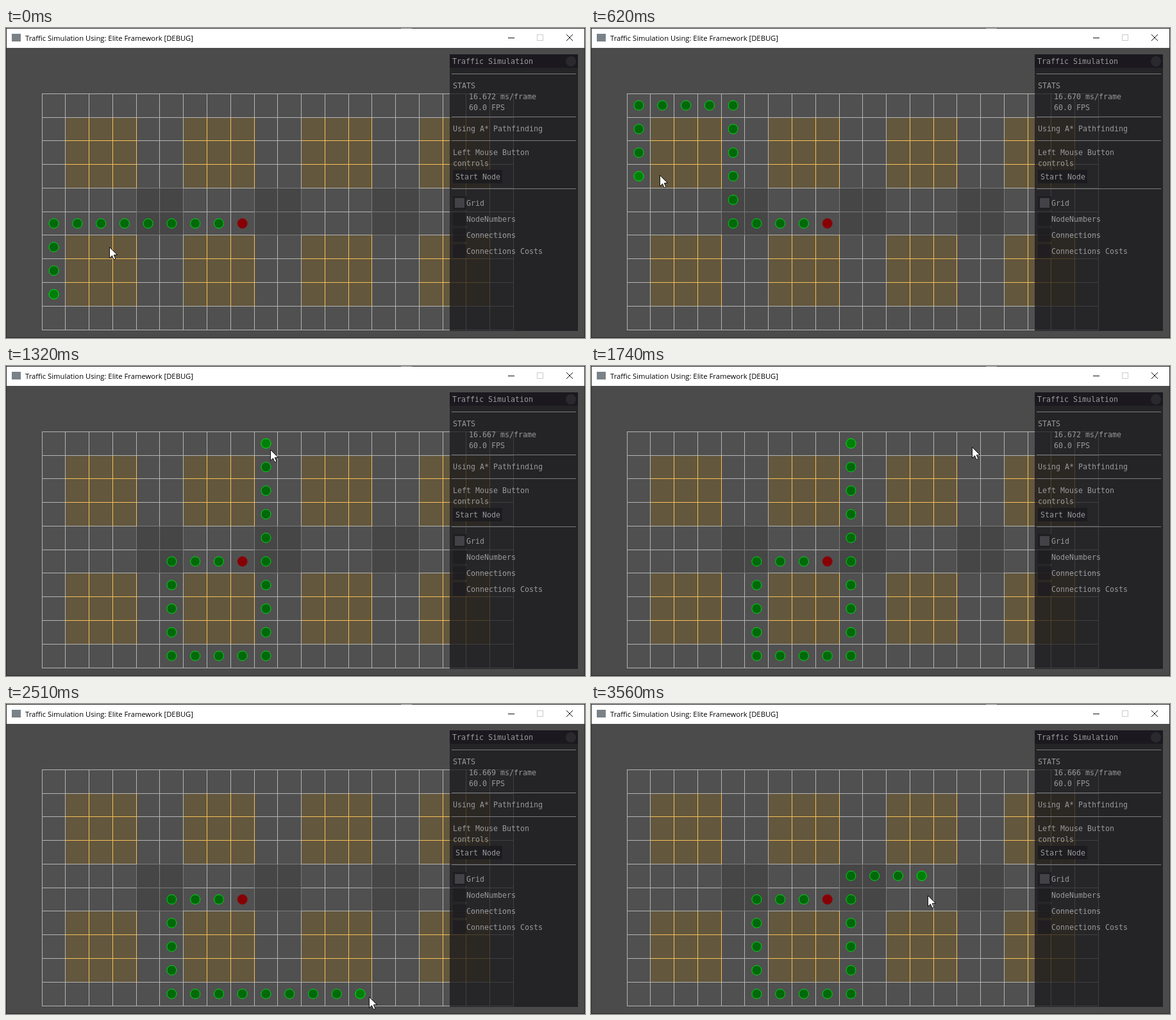
These frames come from a looping animation (903 by 483 pixels, 3630 ms). An HTML page with a canvas:

```html
<!DOCTYPE html>
<html lang="en">
<head>
<meta charset="utf-8">
<title>Traffic Simulation</title>
<style>
html, body { margin: 0; width: 903px; height: 483px; overflow: hidden; background: #4b4b4b; }
canvas { display: block; }
</style>
</head>
<body>
<canvas id="stage" width="903" height="483"></canvas>
<script>
const ctx = document.getElementById('stage').getContext('2d');
const LOOP = 3630, STEP = 70, COLS = 20, ROWS = 10;
const LINE = '#b4b4b4', DIM = '#7b7b7b', ORANGE = '#f4c05a';
const CELL_W = 36.76, CELL_H = 36.78;
const GOAL = { x: 8, y: 5 };
const DIRECTIONS = { L: [-1, 0], R: [1, 0], U: [0, -1], D: [0, 1] };

// Mouse stops; each click installs a new route, written from the goal back to the start node.
const stops = [
  { time: 0, x: 161, y: 341, route: 'L8 D3' },
  { time: 480, x: 84, y: 237, route: 'L4 U5 L4 D3' },
  { time: 1180, x: 391, y: 130, route: 'L3 D4 R4 U9' },
  { time: 1810, x: 594, y: 126, route: 'L3 D4 R9 U9' },
  { time: 2440, x: 566, y: 456, route: 'L3 D4 R8' },
  { time: 3210, x: 524, y: 285, route: 'L3 D4 R4 U5 R3' },
  { time: LOOP, x: 525, y: 298 }
];
const REST_BEFORE = 3 * STEP, REST_AFTER = STEP;

const colX = i => Math.floor(56.17 + CELL_W * i);
const rowY = j => Math.floor(102.3 + CELL_H * j);
const smooth = u => u * u * (3 - 2 * u);
const clamp = u => Math.min(1, Math.max(0, u));

function rect(color, x, y, w, h) {
  ctx.fillStyle = color;
  ctx.fillRect(x, y, w, h);
}

function disc(x, y, r, fill, stroke) {
  ctx.beginPath();
  ctx.arc(x, y, r, 0, Math.PI * 2);
  ctx.fillStyle = fill;
  ctx.fill();
  if (!stroke) return;
  ctx.strokeStyle = stroke;
  ctx.lineWidth = 1;
  ctx.stroke();
}

const hLine = (color, i, j, cells) => rect(color, colX(i), rowY(j), colX(i + cells) - colX(i) + 1, 1);
const vLine = (color, i, j, cells) => rect(color, colX(i), rowY(j), 1, rowY(j + cells) - rowY(j) + 1);
const fillCells = (color, i, j, w, h) =>
  rect(color, colX(i), rowY(j), colX(i + w) - colX(i), rowY(j + h) - rowY(j));

function gridLines(color, i, j, w, h) {
  for (let k = 0; k <= w; k++) vLine(color, i + k, j, h);
  for (let k = 0; k <= h; k++) hLine(color, i, j + k, w);
}

function drawBuilding(i, j) {
  fillCells('#63573d', i, j, 3, 3);
  gridLines(LINE, i, j, 3, 3);
  for (let k = 1; k <= 2; k++) hLine(ORANGE, i, j + k, 3);
  for (let k = 1; k <= 3; k++) vLine(ORANGE, i + k, j, 3);
}

function drawGrid() {
  fillCells('#505050', 0, 0, COLS, ROWS);
  gridLines(LINE, 0, 0, COLS, ROWS);
  for (let i = 4; i < 15; i += 5) {
    fillCells('#464646', i, 4, 2, 2);
    gridLines(DIM, i, 4, 2, 2);
  }
  for (let j = 1; j < ROWS; j += 5) {
    for (let i = 1; i < COLS; i += 5) drawBuilding(i, j);
  }
}

function drawNode({ x, y }, fill, stroke) {
  disc(74.6 + CELL_W * x, 120.6 + CELL_H * y, 7.5, fill, stroke);
}

function drawRoute(route) {
  const node = { ...GOAL };
  drawNode(node, '#860006', '#8e0004');
  for (const leg of route.split(' ')) {
    const [dx, dy] = DIRECTIONS[leg[0]];
    for (let n = 0; n < Number(leg[1]); n++) {
      node.x += dx;
      node.y += dy;
      drawNode(node, '#00690a', '#00d41a');
    }
  }
  drawNode(node, '#008008', '#00d41a');
}

function drawWindow() {
  rect('#2b2b2b', 0, 0, 903, 483);
  rect('#4b4b4b', 1, 1, 901, 481);
  rect('#fff', 1, 1, 901, 30);
  rect('#77756e', 616, 0, 17, 1);
  rect('#7a8288', 9, 9, 14, 12);

  ctx.fillStyle = '#000';
  ctx.font = '11.25px "Open Sans", sans-serif';
  ctx.fillText('Traffic Simulation Using: Elite Framework [DEBUG]', 30, 20);

  rect('#111', 783, 15, 10, 1);
  ctx.lineWidth = 1;
  ctx.strokeStyle = '#ccc';
  ctx.strokeRect(828.5, 10.5, 9, 9);
  ctx.strokeStyle = '#111';
  ctx.beginPath();
  ctx.moveTo(874, 10);
  ctx.lineTo(884, 20);
  ctx.moveTo(884, 10);
  ctx.lineTo(874, 20);
  ctx.stroke();
}

function drawPanel(frameTime) {
  rect('rgba(23,23,26,.74)', 692, 41, 200, 431);
  rect('rgba(24,22,28,.75)', 692, 41, 200, 21);
  disc(881, 52, 8, '#2a292e');
  for (const y of [71, 138, 175, 250]) rect('#7d7d80', 695, y, 194, 1);
  rect('rgba(26,25,30,.8)', 697, 221, 77, 21);

  ctx.font = '11.63px "DejaVu Sans Mono", monospace';
  const text = (str, x, y) => {
    ctx.fillStyle = '#99999b';
    ctx.fillText(str, x, y);
  };
  text('Traffic Simulation', 696, 56);
  text('STATS', 697, 94);
  text(frameTime.toFixed(3) + ' ms/frame', 722, 111);
  text('60.0 FPS', 722, 128);
  text('Using A* Pathfinding', 697, 161);
  text('Left Mouse Button', 697, 198);
  text('controls', 697, 215);
  text('Start Node', 701, 236);
  ['Grid', 'NodeNumbers', 'Connections', 'Connections Costs'].forEach((label, k) => {
    rect('rgba(28,27,31,.75)', 697, 262 + 25 * k, 21, 21);
    text(label, 718, 277 + 25 * k);
  });
  rect('#434347', 700, 265, 15, 15);
}

function drawCursor(x, y) {
  const arrow = [[0, 0], [0, 17], [4, 13.3], [6.7, 19.3], [9.4, 18.2], [6.8, 12.3], [12, 12]];
  ctx.beginPath();
  for (const [dx, dy] of arrow) ctx.lineTo(x + dx + 0.5, y + dy + 0.5);
  ctx.closePath();
  ctx.fillStyle = '#fff';
  ctx.fill();
  ctx.strokeStyle = '#111';
  ctx.lineWidth = 1;
  ctx.stroke();
}

function mouseAt(t) {
  const next = stops.findIndex(s => s.time - REST_BEFORE > t - REST_BEFORE && s.time > t);
  const a = stops[next - 1], b = stops[next];
  const leave = a.time ? a.time + REST_AFTER : 0;
  const u = smooth(clamp((t - leave) / (b.time - REST_BEFORE - leave)));
  return [Math.round(a.x + (b.x - a.x) * u), Math.round(a.y + (b.y - a.y) * u)];
}

function draw(elapsed) {
  // The first step is cut short by 10 ms after the fourth tick.
  const shift = elapsed < 4 * STEP - 10 ? 0 : 10;
  const t = Math.floor((elapsed + shift) / STEP) * STEP - shift;
  const current = stops.filter(s => s.time <= t + 10).pop();

  drawWindow();
  drawGrid();
  drawRoute(current.route);
  drawPanel(16.672 - 0.0033 * ((t + 90) % 1830) / 1000);

  const [x, y] = mouseAt(t);
  const pressed = stops.some(s => s.route && s.time && Math.abs(t - s.time + 5) <= STEP + 10);
  const clicked = pressed && t < current.time + STEP - 10;
  if (clicked) disc(x, y, 12, 'rgba(206,190,31,.75)');
  drawCursor(x, y);
}

const start = performance.now();
function tick() {
  draw((performance.now() - start) % LOOP);
  requestAnimationFrame(tick);
}
tick();
</script>
</body>
</html>
```
